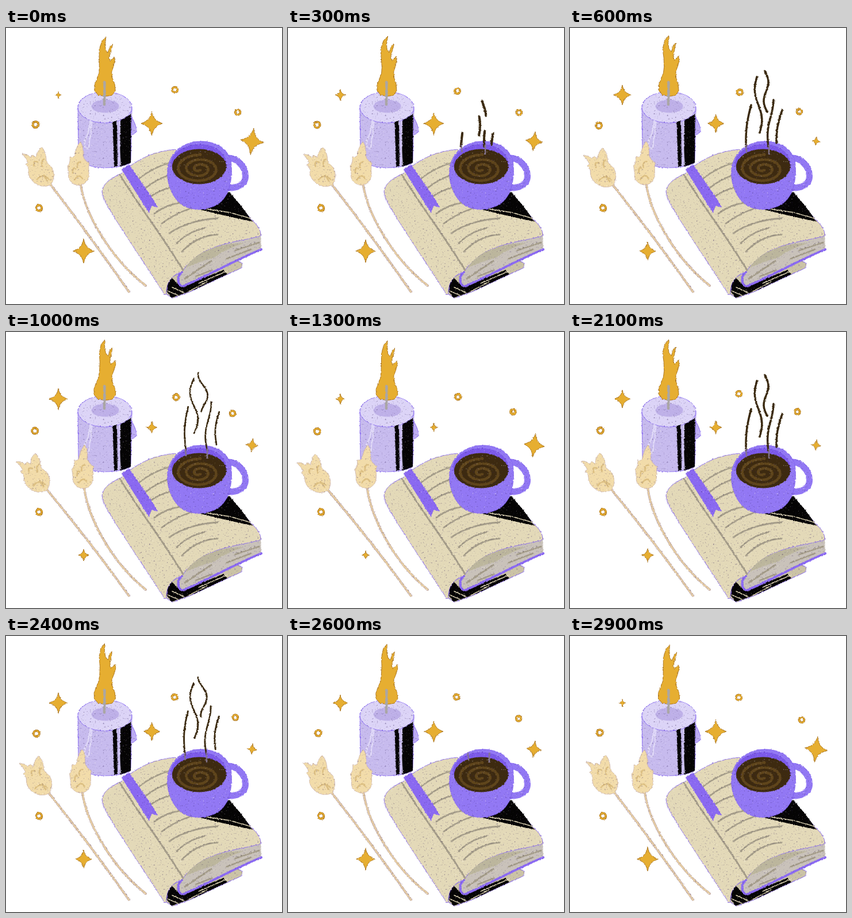
Write an HTML page that moves like this. It is 480 by 480 pixels and loops after 3000 ms.

```html
<!DOCTYPE html>
<html lang="en">
<head>
<meta charset="utf-8">
<title>Candle, book and coffee</title>
<style>
  html, body { margin: 0; width: 100%; height: 100%; overflow: hidden; background: #fff; }
  svg { display: block; width: 100vw; height: 100vh; }
  .line { fill: none; stroke-linecap: round; stroke-linejoin: round; }
  .grain { filter: url(#grain); }
  .rough { filter: url(#rough); }
  .edge { stroke: #7d5cf0; stroke-width: .8; }
  .cream { fill: #e3d9b8; }
  .ink { fill: #050404; }
  .print { stroke: #a39b88; stroke-width: 2.8; }
  .scratch { stroke: #e3d9b8; stroke-width: 1.5; }
  .gold { fill: #e6ae31; stroke: #a8701a; stroke-width: .9; stroke-linejoin: round; }
  .star { vector-effect: non-scaling-stroke; }
  .head { fill: #f2dcaa; stroke: #c4a9a4; stroke-width: .7; }
  .vein { stroke: #dcbf82; stroke-width: 2.6; }
  .husk { stroke: #b9a3ac; stroke-width: 4; }
  .straw { stroke: #e8cfa2; stroke-width: 2.6; }
  .steam { stroke: #3b2a10; }
  .stub { stroke: #84758f; stroke-width: 2.6; }
</style>
</head>
<body>
<svg viewBox="0 0 480 480">
  <defs>
    <filter id="rough" filterUnits="userSpaceOnUse" x="0" y="0" width="480" height="480" color-interpolation-filters="sRGB">
      <feTurbulence type="fractalNoise" baseFrequency=".35" numOctaves="2" seed="4"/>
      <feDisplacementMap in="SourceGraphic" scale="3" xChannelSelector="R" yChannelSelector="G"/>
    </filter>
    <filter id="grain" filterUnits="userSpaceOnUse" x="0" y="0" width="480" height="480" color-interpolation-filters="sRGB">
      <feTurbulence type="fractalNoise" baseFrequency=".35" numOctaves="2" seed="4" result="n"/>
      <feDisplacementMap in="SourceGraphic" in2="n" scale="3" xChannelSelector="R" yChannelSelector="G" result="s"/>
      <feColorMatrix in="n" values="0 0 0 0 1  0 0 0 0 .98  0 0 0 0 .94  3 0 0 0 -2.1" result="dots"/>
      <feComposite in="dots" in2="s" operator="in" result="light"/>
      <feColorMatrix in="n" values="0 0 0 0 .2  0 0 0 0 .12  0 0 0 0 .35  0 2 0 0 -1.3" result="specks"/>
      <feComposite in="specks" in2="s" operator="in" result="dark"/>
      <feMerge><feMergeNode in="s"/><feMergeNode in="dark"/><feMergeNode in="light"/></feMerge>
    </filter>
    <path id="stemA"/>
    <path id="stemB"/>
  </defs>

  <g class="grain">
    <path class="edge" fill="#bfaff5" d="M217 153C222 160 227 171 227 179Q224 186 216 186Z"/>
    <path class="edge" fill="#c7bbee" d="M125 138L126 222C128 234 145 243 172 243C190 243 208 240 217 234L219 138Z"/>
    <ellipse class="edge" cx="172" cy="138" rx="47" ry="27" fill="#dcd4f7"/>
    <ellipse cx="172.500" cy="136" rx="24" ry="11.500" fill="#beb0e8"/>
    <path class="ink" d="M199 160Q209 156 217.500 149L217 234Q207 239 198 241Z"/>
    <path class="ink" d="M185.500 163L193 161L194 240L188 241Z"/>
    <path class="line" stroke="#d3caf2" stroke-width="1.500" d="M198 163L197 205L199 238"/>
    <path class="line" stroke="#e0d9f8" stroke-width="2.600" d="M147 160C143 174 146 180 139 191C135 201 136 209 142 210C147 208 143 199 146 191C150 180 147 172 149 163"/>
  </g>
  <path id="flame" class="gold rough"/>
  <path class="line rough" stroke="#aaa6a5" stroke-width="4.500" d="M171.500 94L171 133"/>

  <g class="grain">
    <path class="edge" fill="#cbc3a6" d="M278 462C277 442 284 432 300 428L400 404L411 409L410 417L322 458L290 470Z"/>
    <path class="ink" d="M277 455Q279 440 286 432L304 450L378 421L385 428L330 454L298 466L288 469Z"/>
    <path class="line scratch" d="M281 457L299 465M289 451L309 460M318 458L350 441M335 444L386 422"/>
    <path fill="#c9c2ba" d="M312 412C335 385 385 372 443 358L444 385L306 449C298 444 298 434 304 426Z"/>
    <path class="cream edge" d="M167 284C168 270 185 260 200 253C222 233 250 215 295 211L385 286L430 336Q444 349 443 361C420 370 362 372 328 400Q316 409 306 424C288 430 279 441 279 462L276 464C240 408 197 345 178 312Q168 297 167 284Z"/>
    <path fill="#bcb69d" d="M312 417C330 388 372 374 414 374Q382 384 362 399Q340 405 312 417Z"/>
    <path class="line" stroke="#8b6af2" stroke-width="4" d="M306 425C296 432 298 449 308 449C345 434 395 405 444 385"/>
    <path class="line print" d="M311 436L357 405M330 432L358 421M384 401L426 385M398 387L440 373"/>
    <path class="line print" d="M198 255C228 305 272 362 308 421"/>
    <path class="line print" d="M231 262Q255 243 285 234M242 279Q260 264 283 256M250 294Q264 284 283 278M258 323Q276 308 302 304M271 340Q298 319 335 310M284 357Q318 334 368 331M306 389Q332 361 368 359"/>
    <path class="line print" d="M297 374Q318 354 345 348"/>
    <path fill="#8a69f1" d="M201 246L214 237L257 299L264 312L253 309L249 322L239 307Z"/>
    <path class="ink" d="M338 316L388 285C402 300 416 318 429 337L388 328Z"/>
    <path class="line scratch" d="M350 315L390 321L425 331"/>
  </g>

  <g class="grain">
    <path class="line" stroke="#9278f4" stroke-width="11" d="M387 226C402 226 416 241 416.500 257C417 272 403 279 384 278"/>
    <path class="edge" fill="#9278f4" d="M281 246C284 215 310 197 340 197C372 198 390 215 392 238C394 275 384 297 367 307C346 319 320 317 305 307C288 293 279 270 281 246Z"/>
    <path fill="#7c5aea" d="M287 241C285 217 309 202 338 202C367 203 385 220 384 241Z"/>
    <ellipse cx="336" cy="241" rx="47" ry="30.500" fill="#3d2a10"/>
    <path id="swirl" class="line" stroke="#5f451b" stroke-width="4.400"/>
  </g>

  <g class="rough" id="vapour"></g>
  <g class="grain">
    <g class="line husk"><use href="#stemA"/><use href="#stemB"/></g>
    <g class="line straw"><use href="#stemA"/><use href="#stemB"/></g>
    <g id="headA">
      <path class="head" d="M77 273C84 266 85 252 80 243C77 238 71 236 70 230C70 220 67 212 62 207C56 212 54 217 52 225L47 221Q43 222 43 225Q36 218 28 219C32 223 36 229 38 234L34 237Q40 242 39 250C39 262 50 272 62 275Q71 276 77 273Z"/>
      <path class="line vein" d="M49 240Q46 229 55 233M63 240Q61 230 66 228M54 263Q64 252 75 263M66 256L72 266"/>
    </g>
    <g id="headB">
      <path class="head" d="M129 198C135 204 134 215 134 223Q139 233 145 235C142 242 146 255 142 264C137 272 130 275 122 273C113 270 107 262 109 254L107 240Q112 236 111 224Q117 226 119 222C121 212 124 204 129 198Z"/>
      <path class="line vein" d="M124 243Q123 232 130 233M116 252Q116 240 121 245M119 264Q127 252 133 262"/>
    </g>
  </g>
  <g class="rough" id="sparks"></g>
</svg>

<script>
const LOOP = 3000, HALF = 1500, STEP = 100, TAU = Math.PI * 2;
const $ = id => document.getElementById(id);
const wave = (t, peak = 0, span = LOOP) => Math.cos(TAU * (t - peak) / span);
const mix = (a, b, k) => a + (b - a) * k;
const put = (el, attrs) => { for (const k in attrs) el.setAttribute(k, attrs[k]); };
const add = (parent, tag, attrs) => {
  const el = document.createElementNS("http://www.w3.org/2000/svg", tag);
  put(el, attrs);
  return parent.appendChild(el);
};
const poly = pts => "M" + pts.map(p => p.map(v => v.toFixed(1)).join(" ")).join("L");

// Cosine easing through [time, value] pairs
function ease(t, keys) {
  const i = keys.findIndex(k => k[0] > t);
  const [t0, a] = keys[i - 1], [t1, b] = keys[i];
  return mix(a, b, (1 - Math.cos(Math.PI * (t - t0) / (t1 - t0))) / 2);
}

// Coffee swirl
put($("swirl"), { d: poly(Array.from({ length: 110 }, (_, i) => {
  const a = i / 109 * TAU * 2.6, r = 4 + i / 109 * 36;
  return [336 + r * Math.cos(a + 1), 245 + r * .62 * Math.sin(a + 1)];
})) });

// Sparkles and rings
const STAR = "M0-1C.13-.42 .3-.22 .88 0C.3.22 .14.42 0 1C-.14.42-.3.22-.88 0C-.3-.22-.13-.42 0-1Z";
const stars = [
  { x: 91, y: 116.5, size: t => ease(t, [[0, 6], [850, 20], [1500, 6], [2350, 18], [3000, 6]]) },
  { x: 253.5, y: 166, size: t => 13.8 + 7.2 * wave(t) },
  { x: 428, y: 197, tilt: 7, size: t => ease(t, [[0, 23], [700, 7], [1500, 23], [2250, 8], [3000, 23]]) },
  { x: 135, y: 388, size: t => 13.8 + 7.2 * wave(t) }
];
const rings = [
  { r: 5, at: t => [51.5 + 1.5 * wave(t, 2250), 170.5 - 2.5 * wave(t)] },
  { r: 4.6, at: t => [294.5 + 1.5 * wave(t, 1050), 109.7 + 3.7 * wave(t, 1050)] },
  { r: 4.4, at: t => [397 + 6 * wave(t), 142 + 5 * wave(t, 200)] },
  { r: 4.8, at: () => [57.5, 313] }
];
for (const s of stars) s.el = add($("sparks"), "path", { d: STAR, class: "gold star" });
for (const g of rings) {
  g.el = add($("sparks"), "g", {});
  add(g.el, "circle", { r: g.r, fill: "none", stroke: "#a8701a", "stroke-width": 3.8 });
  add(g.el, "circle", { r: g.r, fill: "none", stroke: "#e6ae31", "stroke-width": 2.2 });
}

// Steam strands: bottom x, y, top x, y, sway, waves, bottom drift x, y, phase drift
const strands = [
  [306, 206, 315, 134, -3, .5, 7, 0, 0],
  [330, 182, 325, 85, 5, 1, -3, -6, 0],
  [343, 146, 339, 75, -5, 1, 3, -8, 2],
  [345, 206, 351, 125, -3, .8, 5, 0, 0],
  [359, 200, 369, 143, -3, .5, 7, -4, 0]
].map(s => ({ s, el: add($("vapour"), "path", { class: "line steam" }) }));
const stubs = add($("vapour"), "path", { class: "line stub" });

function drawSteam(p) {
  const k = (p - 600) / 400, grow = Math.min(1, (p - 200) / 300);
  const on = p > 200 && p <= 1000;
  for (const { s: [x0, y0, x1, y1, sway, n, dx, dy, turn], el } of strands) {
    const pts = [];
    for (let i = 0; on && i <= 16; i++) {
      const u = i / 16 * grow;
      const bend = sway * (1 + .4 * k) * Math.sin(TAU * n * u + turn * k);
      pts.push([mix(x0 + dx * k, x1 + 1.8 * k, u) + bend, mix(y0 + dy * k, y1 - 4 * k, u)]);
    }
    put(el, { d: pts.length ? poly(pts) : "", "stroke-width": 3.5 - .8 * k });
  }
  const a = Math.min(314, 307 + 6 * k), b = Math.min(350, 346 + 4 * k);
  put(stubs, { d: p > 200 && p <= 1100 ? `M${a - 1} 204L${a} 215M${b} 204L${b} 219` : "" });
}

const flame = [
  [173, 14], [166, 22], [162, 37], [163, 53], [163, 68], [162, 78], [158, 89], [154, 99],
  [154, 109], [160, 116], [172, 119], [184, 117], [190, 109], [189, 99], [185, 87], [184, 76],
  [188, 65], [190, 56], [189, 50], [182, 57], [179.5, 50], [183, 38], [185, 27],
  [181, 31], [177, 42], [173, 37], [172, 27]
];
function drawFlame(p) {
  const wide = 1 + .07 * wave(p, 1150, HALF), lift = 1.2 * wave(p, 700, HALF);
  put($("flame"), { d: poly(flame.map(([x, y]) => {
    const h = (119 - y) / 105;
    const curl = 1.2 * h * Math.sin(TAU * p / HALF + y / 13);
    return [172 + (x - 172) * mix(wide, 1, h) + curl - .3 * h, y - lift * h];
  })) + "Z" });
}

function drawWheat(t) {
  const k = (1 - wave(t)) / 2;
  const ax = -8 * k, ay = 3 * k, bx = 10 * k, by = -2 * k;
  put($("stemA"), { d: `M${78 + ax} ${273 + ay}Q${148 - 3 * k} 364 214 459` });
  put($("stemB"), { d: `M${130 + bx * .8} ${273 + by}C${138 + bx * .7} 325 ${183 + 3 * k} 402 243 448` });
  put($("headA"), { transform: `translate(${ax} ${ay}) rotate(${-6.3 * k} 78 273)` });
  put($("headB"), { transform: `translate(${bx} ${by})` });
}

function draw(t) {
  drawFlame(t % HALF);
  drawSteam(t % HALF);
  drawWheat(t);
  for (const s of stars)
    put(s.el, { transform: `translate(${s.x} ${s.y}) rotate(${s.tilt || 0}) scale(${s.size(t)})` });
  for (const g of rings) put(g.el, { transform: `translate(${g.at(t)})` });
}

let start, last = -1;
function tick(now) {
  start ??= now;
  const t = Math.floor((now - start) % LOOP / STEP) * STEP;
  if (t !== last) draw(last = t);
  requestAnimationFrame(tick);
}
draw(0);
requestAnimationFrame(tick);
</script>
</body>
</html>
```
